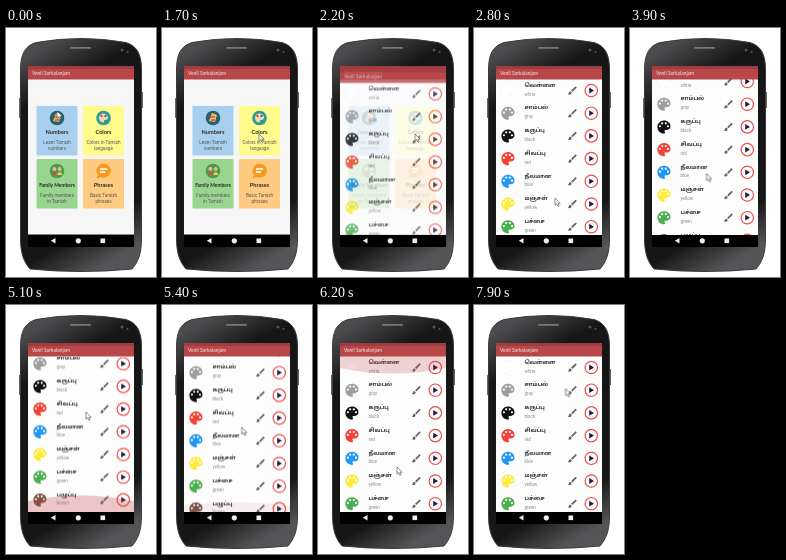
Recreate the animation shown at these times as an HTML page. Size 150x249 px, loop 8000 ms.

```html
<!DOCTYPE html>
<html lang="en">
<head>
<meta charset="utf-8">
<title>Language app demo</title>
<style>
html, body { margin: 0; width: 100%; height: 100%; overflow: hidden; background: #fff; }
svg { display: block; width: 150px; height: 249px; }
text { font-family: Roboto, sans-serif; }
.title { font: 500 4.9px Lato, cursive; fill: #f3dcdc; }
.head { font-family: Lato, cursive; font-weight: 700; fill: #2b2b2b; text-anchor: middle; }
.desc { font-size: 4.6px; fill: #555; text-anchor: middle; }
.word { font: 600 5.4px "Noto Sans", "Noto Sans Tamil", sans-serif; fill: #333; }
.sub { font-size: 4.5px; fill: #8c8c8c; }

#page, #list, #cursor, .glow { animation: 8s linear infinite; }
#page { animation-name: open; }
#list { animation-name: scroll; }
#cursor { animation-name: point; }
.glow { fill: #c0393f; opacity: 0; }
#low { animation-name: low; transform-origin: 75px 206.5px; }
#high { animation-name: high; transform-origin: 75px 52px; }

@keyframes open {
  0%, 23.75% { opacity: 0; transform: translateY(16px); animation-timing-function: ease-out; }
  30%, 100% { opacity: 1; transform: none; }
}
@keyframes scroll {
  0%, 43.75% { transform: none; }
  48.75%, 50% { transform: translateY(-9px); }
  60%, 65% { transform: translateY(-26.5px); }
  72.5%, 100% { transform: none; }
}
@keyframes low {
  0%, 60% { opacity: 0; transform: scaleY(.2); }
  63.75% { opacity: .28; transform: none; }
  69%, 100% { opacity: 0; transform: scaleY(.4); }
}
@keyframes high {
  0%, 72.5% { opacity: 0; transform: scaleY(.2); }
  77.5% { opacity: .22; transform: none; }
  86%, 100% { opacity: 0; transform: scaleY(.4); }
}
@keyframes point {
  0% { transform: translate(51px, 83px); }
  1.25% { transform: translate(55px, 88px); }
  7.5%, 11.25% { transform: translate(105px, 166px); }
  17.5%, 18.75% { transform: translate(94px, 112px); }
  21.25%, 31.25% { transform: translate(97px, 106px); }
  35% { transform: translate(81px, 170px); }
  38.75%, 43.75% { transform: translate(78px, 185px); }
  48.75%, 50% { transform: translate(76.5px, 145.5px); }
  61.25% { transform: translate(80px, 112px); }
  63.75%, 65% { transform: translate(80px, 107px); }
  72.5% { transform: translate(79px, 152px); }
  75%, 77.5% { transform: translate(79px, 162px); }
  87.5%, 92.5% { transform: translate(77px, 86px); }
  98.75%, 100% { transform: translate(91.5px, 83.5px); }
}
</style>
</head>
<body>
<svg viewBox="0 0 150 249">
  <defs>
    <clipPath id="screen"><path d="M22 38H128V206.5H22z"/></clipPath>
    <clipPath id="body"><path d="M22 51.5H128V206.5H22z"/></clipPath>
    <linearGradient id="shell" x1=".3" x2=".6" y1="0" y2="1">
      <stop stop-color="#4c4c4e"/><stop offset=".2" stop-color="#161617"/>
      <stop offset=".82" stop-color="#161617"/><stop offset="1" stop-color="#555557"/>
    </linearGradient>
    <g id="palette">
      <path d="M12 3c-5 0-9 4-9 9s4 9 9 9c.8 0 1.5-.7 1.5-1.5 0-.4-.2-.7-.4-1-.2-.3-.4-.6-.4-1 0-.8.7-1.5 1.5-1.5H16c2.8 0 5-2.2 5-5 0-4.4-4-8-9-8z"/>
      <g fill="#fff" stroke="none">
        <circle cx="6.5" cy="11" r="1.5"/><circle cx="9.5" cy="7" r="1.5"/>
        <circle cx="14.5" cy="7" r="1.5"/><circle cx="17.5" cy="11" r="1.5"/>
      </g>
    </g>
    <path id="brush" d="M7 14c-1.7 0-3 1.3-3 3 0 1.3-1.2 2-2 2 .9 1.2 2.5 2 4 2 2.2 0 4-1.8 4-4 0-1.7-1.3-3-3-3zM20.7 4.6l-1.3-1.3c-.4-.4-1-.4-1.4 0L9 12.2 11.8 15l8.9-9c.4-.4.4-1 0-1.4z"/>
    <g id="bar">
      <path d="M22 38H128V51.5H22z" fill="#b8474a"/>
      <path d="M22 38H128V41H22z" fill="#a03c40"/>
      <text class="title" x="26" y="46.500">Venil Sorkalanjam</text>
    </g>
  </defs>

  <path d="M13.2 70h2v20h-2zM134.800 64h2v16h-2z" fill="#444"/>
  <path d="M14.500 42C14.500 26 19 18 30 14.500Q75 6.500 120 14.500C131 18 135.500 26 135.500 42V210C135.500 226 132 234 126 241Q75 246 24 241C18 234 14.500 226 14.500 210z" fill="url(#shell)" stroke="#3a3a3c"/>
  <rect x="64" y="19" width="21" height="1.800" rx=".9" fill="#777"/>
  <g fill="#555"><circle cx="116" cy="22" r="1.500"/><circle cx="121.500" cy="24" r="1"/></g>
  <path d="M22 206.500H128V219H22z" fill="#000"/>
  <g fill="#eee">
    <path d="M49.500 210V215.600L44.800 212.800z"/><circle cx="72.300" cy="212.800" r="2.600"/><path d="M94.500 210.500h4.600v4.600h-4.600z"/>
  </g>

  <g clip-path="url(#screen)">
    <path d="M22 38H128V207H22z" fill="#f6f6f6"/>
    <use href="#bar"/>
    <g id="cards"></g>
    <g id="page">
      <path d="M22 38H128V207H22z" fill="#fdfdfd"/>
      <g clip-path="url(#body)">
        <g id="list"></g>
        <path id="low" class="glow" d="M22 207V196Q75 185 128 196V207z"/>
        <path id="high" class="glow" d="M22 51V63Q75 74 128 63V51z"/>
      </g>
      <use href="#bar"/>
    </g>
  </g>
  <path id="cursor" d="M0 0V7.200L1.700 5.700 2.900 8.300 4.100 7.700 2.900 5.300H5.200z" fill="#fff" stroke="#444" stroke-width=".6"/>
</svg>
<script>
const icons = {
  numbers: `<circle r="7.300" fill="#28606b"/><path d="M-4 3L-1-5 4-3 2 4z" fill="#e9c46a"/>
    <path d="M-3-1h5M-2 2h4" stroke="#d4503e" stroke-width="1.500"/>`,
  colors: `<circle r="7.300" fill="#2b9a9a"/><g transform="translate(-6 -6) scale(.5)" fill="#f4d9a0"><use href="#palette"/></g>
    <circle cx="-2" cy="-2" r="1.200" fill="#d4403a"/><circle cx="2" cy="-2" r="1.200" fill="#3a62b8"/>`,
  family: `<circle r="7.300" fill="#4b9a4f"/><g fill="#f0b48a"><circle cx="-2.600" cy="-2" r="2"/><circle cx="2.600" cy="-2" r="2"/></g>
    <path d="M-5.500 4Q-2.600-2 0 4z" fill="#d4503e"/><path d="M0 4Q2.600-2 5.500 4z" fill="#f2d04c"/>`,
  phrases: `<path d="M0-7.300A7.300 7 0 1 1-3 6L-7 7.500-5.500 4A7.300 7 0 0 1 0-7.300z" fill="#f59a23"/>
    <path d="M-3.500-2h7M-3.500 1h5" stroke="#fff" stroke-width="1.300"/>`
};
const cards = [
  ["numbers", "Numbers", "Learn Tamizh", "numbers", "#a8d0ee", 5.6],
  ["colors", "Colors", "Colors in Tamizh", "language", "#fffb8c", 5.6],
  ["family", "Family Members", "Family members", "in Tamizh", "#98d68f", 4.9],
  ["phrases", "Phrases", "Basic Tamizh", "phrases", "#ffcb80", 5.6]
];
document.getElementById("cards").innerHTML = cards.map(([icon, head, line1, line2, fill, size], i) => `
  <g transform="translate(${51 + i % 2 * 46.5} ${78 + (i >> 1) * 53})">
    <rect x="-20.500" width="41" height="49.500" rx="1" fill="${fill}"/>
    <g transform="translate(0 12)">${icons[icon]}</g>
    <text class="head" y="28" font-size="${size}">${head}</text>
    <text class="desc" y="37.500">${line1}</text>
    <text class="desc" y="43.500">${line2}</text>
  </g>`).join("");

const rows = [
  ["வெள்ளை", "white", "#fff"],
  ["சாம்பல்", "gray", "#9e9e9e"],
  ["கருப்பு", "black", "#111"],
  ["சிவப்பு", "red", "#f44336"],
  ["நீலமான", "blue", "#2196f3"],
  ["மஞ்சள்", "yellow", "#ffeb3b"],
  ["பச்சை", "green", "#4caf50"],
  ["பழுப்பு", "brown", "#795548"]
];
document.getElementById("list").innerHTML = rows.map(([word, sub, color], i) => `
  <g transform="translate(0 ${62.5 + i * 22.7})">
    <g transform="translate(25.200 -8.700) scale(.73)" fill="${color}" ${i ? "" : 'stroke="#ddd" stroke-width=".6" stroke-dasharray="1 1"'}><use href="#palette"/></g>
    <text class="word" x="50.500" y="-3.800">${word}</text>
    <text class="sub" x="50.500" y="5">${sub}</text>
    <use href="#brush" transform="translate(93 -5.500) scale(.46)" fill="#666"/>
    <circle cx="117.300" r="6.200" fill="#fff" stroke="#e9504d" stroke-width="1.200"/>
    <path d="M115.200-2.900V2.900L120 0z" fill="#2a1a38"/>
  </g>`).join("");
</script>
</body>
</html>
```
